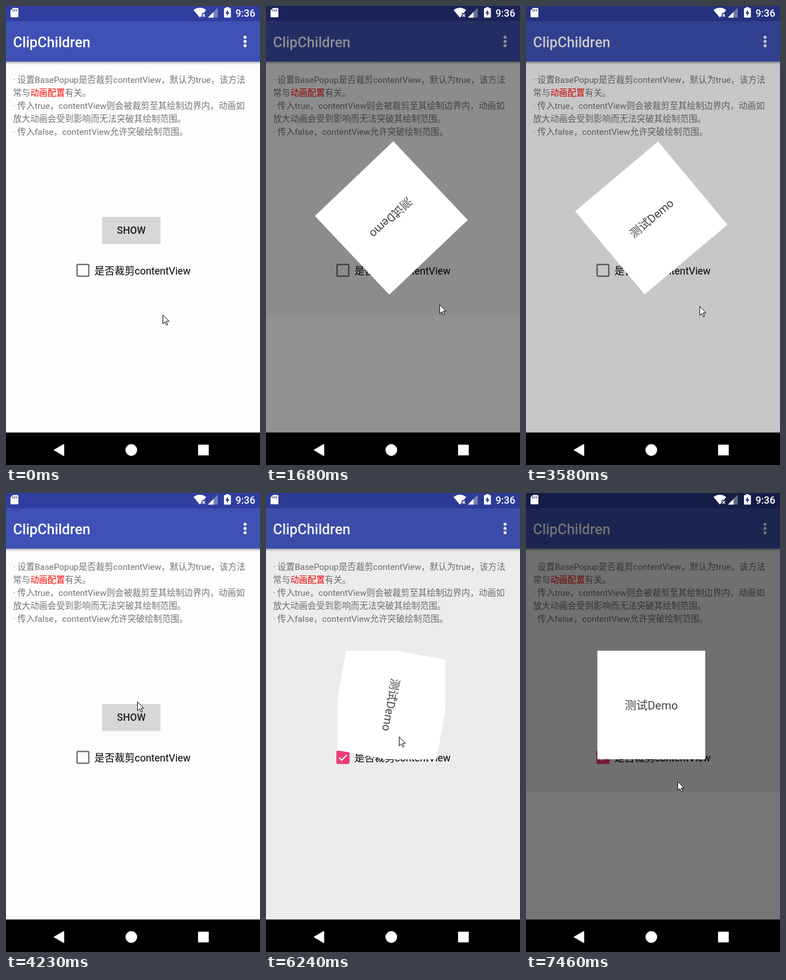
An HTML page for the animation above (8000 ms loop, 451 by 812 pixels).

```html
<!DOCTYPE html>
<html lang="zh">
<head>
<meta charset="utf-8">
<title>ClipChildren</title>
<style>
html, body { margin: 0; width: 100%; height: 100%; overflow: hidden; background: #fdfdfd; }
svg { display: block; width: 100vw; height: 100vh; }
text { font-family: Roboto, "Noto Sans CJK SC", "Noto Sans CJK", sans-serif; white-space: pre; }
.medium { font-weight: 500; }
.note { font-size: 15.35px; fill: #757575; }
</style>
</head>
<body>
<svg viewBox="0 0 451 812" xmlns="http://www.w3.org/2000/svg">
  <defs>
    <linearGradient id="shade" x2="0" y2="1">
      <stop offset="0" stop-opacity=".28"/>
      <stop offset="1" stop-opacity="0"/>
    </linearGradient>
    <clipPath id="frame"><rect x="126.5" y="279" width="192" height="192"/></clipPath>
    <clipPath id="btnClip"><rect x="171" y="373" width="103" height="47" rx="2"/></clipPath>
    <clipPath id="boxClip"><rect x="111" y="441" width="51" height="52"/></clipPath>
  </defs>

  <rect width="451" height="812" fill="#fdfdfd"/>
  <rect y="98" width="451" height="6" fill="url(#shade)"/>
  <rect y="27" width="451" height="71.5" fill="#3f51b5"/>
  <rect width="451" height="27" fill="#303f9f"/>
  <text class="medium" x="12.5" y="73" font-size="25.2" fill="#fff">ClipChildren</text>
  <g fill="#fff">
    <circle cx="424.5" cy="55.3" r="2.7"/>
    <circle cx="424.5" cy="62.8" r="2.7"/>
    <circle cx="424.5" cy="70.3" r="2.7"/>
  </g>

  <g class="note">
    <text x="12.5" y="136">· 设置BasePopup是否裁剪contentView，默认为true，该方法</text>
    <text x="12.5" y="159">常与<tspan fill="#f00">动画配置</tspan>有关。</text>
    <text x="12.5" y="182">· 传入true，contentView则会被裁剪至其绘制边界内，动画如</text>
    <text x="12.5" y="205">放大动画会受到影响而无法突破其绘制范围。</text>
    <text x="12.5" y="228">· 传入false，contentView允许突破绘制范围。</text>
  </g>

  <rect x="170.5" y="374" width="104" height="47.5" rx="2.5" opacity=".13"/>
  <rect x="171" y="373" width="103" height="47" rx="2" fill="#d6d7d6"/>
  <g clip-path="url(#btnClip)"><circle id="press" cx="230" cy="402" fill-opacity=".12"/></g>
  <text class="medium" x="222.5" y="403" font-size="17.6" fill="#1f1f1f" text-anchor="middle">SHOW</text>

  <g clip-path="url(#boxClip)"><circle id="ripple" cx="136.5" cy="467" fill="#ff4081"/></g>
  <rect x="126.2" y="457.2" width="20.8" height="20.8" rx="1.5" fill="none" stroke="#737373" stroke-width="2.5"/>
  <g id="tick">
    <rect x="125" y="456" width="23.2" height="23.2" rx="2.4" fill="#ff4081"/>
    <path d="M129.8 468l4.6 4.6 9.2-9.2" fill="none" stroke="#fff" stroke-width="2.4"/>
  </g>
  <text x="157" y="474.5" font-size="17.9">是否裁剪contentView</text>

  <rect id="dimTop" width="451"/>
  <rect id="dimLow" width="451"/>

  <g id="clip">
    <g id="popup">
      <rect x="126.5" y="279" width="192" height="192" fill="#fff"/>
      <text x="222.5" y="383" font-size="20.3" fill="#444" text-anchor="middle">测试Demo</text>
    </g>
  </g>

  <g fill="#fff">
    <path d="M12.5 3.5H20.5Q22 3.5 22 5V18.5Q22 20 20.5 20H9.5Q8 20 8 18.5V8Z"/>
    <path d="M12.4 6v3.6M15.5 6v3.6M18.6 6v3.6" stroke="#27358a" stroke-width="1.4"/>
    <path d="M333 7.2Q344.2 -1.2 355.4 7.2L351 12.5H347.6V17L344.2 20.5Z"/>
    <path d="M348.8 14.2l4.6 4.8M353.4 14.2l-4.6 4.8" stroke="#fff" stroke-width="1.5"/>
    <path d="M376 3V20.5H358.5Z" opacity=".35"/>
    <path d="M368.5 10.5V20.5H358.5Z"/>
    <path d="M390.5 3.8V2H395.7V3.8H398Q399.3 3.8 399.3 5V19.2Q399.3 20.5 398 20.5H388.2Q387 20.5 387 19.2V5Q387 3.8 388.2 3.8Z"/>
    <path d="M394 6.5L389.6 13.3H392.4V18L396.7 11.2H394Z" fill="#27358a"/>
    <text class="medium" x="407.5" y="18.8" font-size="17.8">9:36</text>
  </g>

  <rect y="754.5" width="451" height="58" fill="#000"/>
  <g fill="#fff" stroke="#fff" stroke-width="2" stroke-linejoin="round">
    <path d="M86 785.5L102.3 776V795Z"/>
    <circle cx="222.5" cy="785.5" r="9.4"/>
    <rect x="342" y="777" width="17" height="17"/>
  </g>

  <path id="cursor" d="M.5 .5V16.2L4.2 12.8L6.9 18.6L9.2 17.5L6.6 11.8H11.6Z" fill="#fff" stroke="#000"/>
</svg>
<script>
const LOOP = 8000, SPIN = 1268, FADE = 1067, DIM = 0.556, LEAVE = 780;
const $ = id => document.getElementById(id);
const set = (id, attrs) => {
  for (const k in attrs) $(id).setAttribute(k, attrs[k]);
};
const ramp = (t, from, len) => Math.min(1, Math.max(0, (t - from) / len));
const smooth = p => p * p * (3 - 2 * p);
const overshoot = (p, s) => 1 + (p - 1) ** 2 * ((s + 1) * (p - 1) + s);
const anticipate = (p, s) => p * p * ((s + 1) * p - s);
const decelerate = p => 1 - (1 - p) ** 2;

// rest: when the pointer settles; edge: where the lower scrim starts
const shows = [
  { start: 1095, rest: 1480, edge: 547, leave: 3160, clip: false },
  { start: 6187, rest: 6500, edge: 528, leave: Infinity, clip: true }
];

// time, x, y
const path = [
  [120, 278, 546], [740, 235, 404], [1080, 235, 404], [1180, 254, 423],
  [1480, 308, 528], [2500, 308, 528], [2570, 308, 531], [3950, 308, 531],
  [4300, 215, 329], [4600, 126, 440], [4770, 170, 487], [4940, 137, 471],
  [5320, 137, 471], [5420, 153, 464], [5800, 222, 397], [6130, 222, 397],
  [6500, 269, 510]
];

function pointer(t) {
  const i = path.findIndex(k => k[0] > t);
  if (i === 0) return path[0].slice(1);
  if (i < 0) return path[path.length - 1].slice(1);
  const [a, x, y] = path[i - 1], [b, u, v] = path[i];
  let p = (t - a) / (b - a);
  if (i === 1) p = smooth(p);
  return [x + (u - x) * p, y + (v - y) * p];
}

function drawPopup(t) {
  const s = shows.find(s => t >= s.start - 11 && t < s.leave + LEAVE);
  const open = s && t >= s.start;
  set('popup', { visibility: open ? 'visible' : 'hidden' });
  let dim = 0, low = 0, edge = 500;
  if (s) {
    const leaving = t >= s.leave;
    const turn = leaving ? anticipate(ramp(t, s.leave, LEAVE), 2)
                         : overshoot(ramp(t, s.start, SPIN), 4);
    dim = DIM * decelerate(ramp(t, s.start - 11, FADE)) * (1 - ramp(t, s.leave, 690));
    edge = s.edge;
    low = dim * (t > s.rest && !leaving ? 0.958 : 1);
    set('popup', { transform: `rotate(${360 * turn} 222.5 375)` });
    set('clip', { 'clip-path': s.clip ? 'url(#frame)' : 'none' });
  }
  set('dimTop', { height: edge, 'fill-opacity': dim });
  set('dimLow', { y: edge, height: 755 - edge, 'fill-opacity': low });
}

function drawButtons(t) {
  const s = shows.find(s => t >= s.start - 115 && t < s.start + 100);
  set('press', { r: s ? 70 * ramp(t, s.start - 115, 150) : 0 });
  set('ripple', {
    r: t < 5170 ? 0 : 8 + 30 * ramp(t, 5170, 170),
    'fill-opacity': 0.16 * (1 - ramp(t, 5260, 200))
  });
  set('tick', { opacity: ramp(t, 5250, 110) });
}

function draw(t) {
  drawPopup(t);
  drawButtons(t);
  const [x, y] = pointer(t);
  set('cursor', { transform: `translate(${Math.round(x)} ${Math.round(y)})` });
}

const begin = performance.now();
function tick() {
  draw((performance.now() - begin) % LOOP);
  requestAnimationFrame(tick);
}
tick();
</script>
</body>
</html>
```
